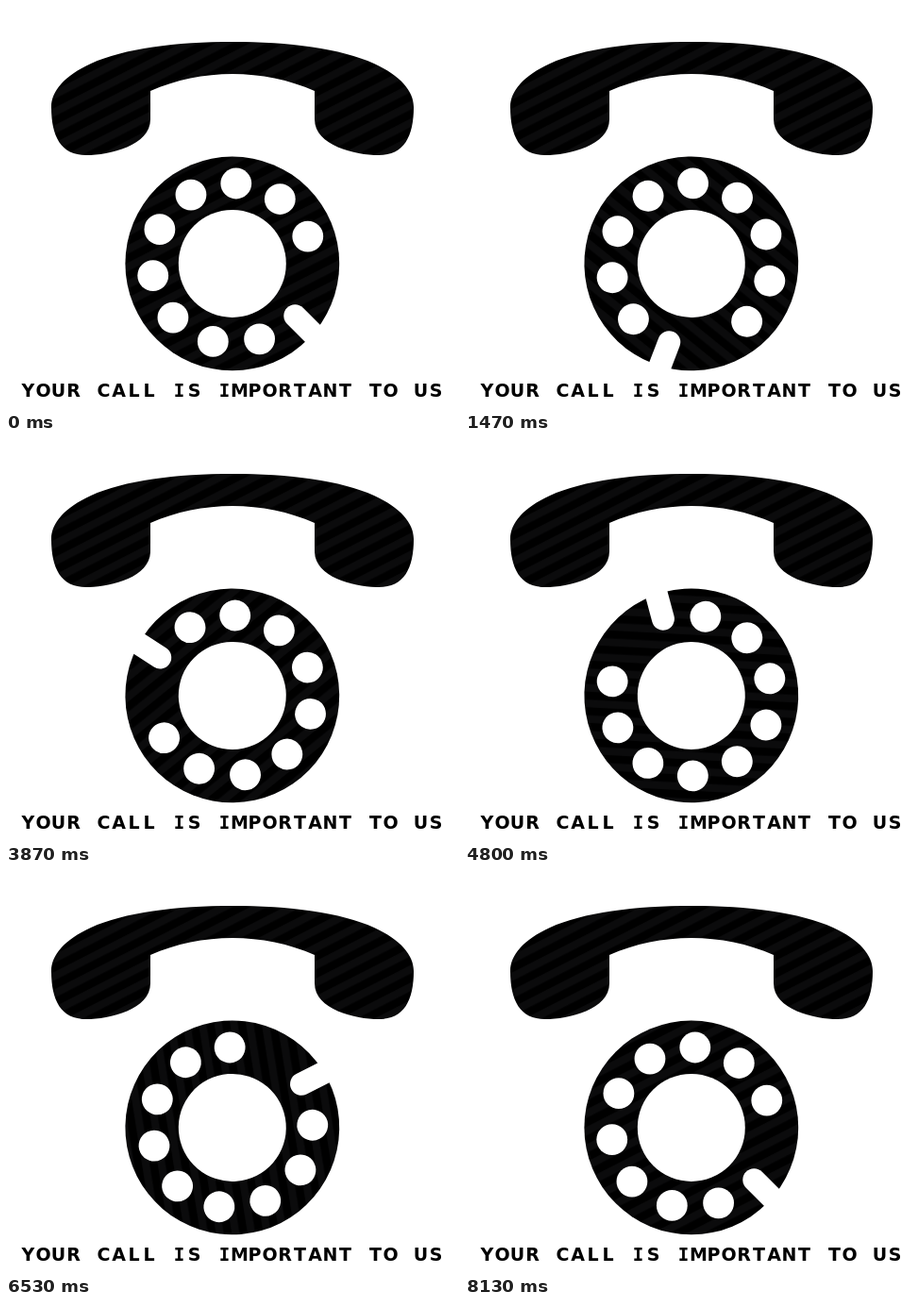
An HTML page that plays this animation: 480 by 428 pixels, repeating every 8.27 s.

```html
<!DOCTYPE html>
<html lang="en">
<head>
<meta charset="utf-8">
<title>On hold</title>
<style>
  html, body { margin: 0; height: 100%; overflow: hidden; background: #fff; }
  svg { display: block; width: 100vw; height: 100vh; }
  text { font: bold 19px "DejaVu Sans", sans-serif; text-anchor: middle; }
  .slab { font-family: "DejaVu Sans Mono", monospace; }
</style>
</head>
<body>
<svg viewBox="0 0 480 428">
  <defs>
    <pattern id="stripes" width="40" height="16.5" patternUnits="userSpaceOnUse" patternTransform="rotate(-27)">
      <rect width="40" height="16.5"/>
      <rect y="4" width="40" height="8" fill="#0b0b0c"/>
    </pattern>
  </defs>
  <g id="dial" fill="#fff">
    <circle cx="239.8" cy="272.9" r="113.4" fill="url(#stripes)"/>
    <circle cx="239.8" cy="272.9" r="57"/>
    <path d="M306.3 328.3l27 27" stroke="#fff" stroke-width="24" stroke-linecap="round"/>
  </g>
  <path fill="url(#stripes)" d="M240 38C180 38 125 45 90 61C62 74 48 90 48 107C48 138 58 158 85 158
    C110 158 153 148 153 120V90C180 78 210 72 240 72C270 72 300 78 327 90V120
    C327 148 370 158 395 158C422 158 432 138 432 107C432 90 418 74 390 61C355 45 300 38 240 38Z"/>
  <text id="line" y="414">YOUR CALL <tspan class="slab">I</tspan>S <tspan class="slab">I</tspan>MPORTANT TO US</text>
</svg>
<script>
  const CX = 239.8, CY = 272.9, LOOP = 8270;
  const dial = document.getElementById('dial');
  const line = document.getElementById('line');

  // one fixed-width cell per letter
  line.setAttribute('x', [...line.textContent].map((_, i) => 23.5 + 16 * i).join(' '));

  for (let i = 0; i < 9; i++) {
    const a = (70.2 + 33.75 * i) * Math.PI / 180;
    const hole = document.createElementNS('http://www.w3.org/2000/svg', 'circle');
    hole.setAttribute('cx', CX + 85 * Math.cos(a));
    hole.setAttribute('cy', CY + 85 * Math.sin(a));
    hole.setAttribute('r', 16.4);
    dial.append(hole);
  }

  // three ticks of 6 degrees every 400 ms, with one tick skipped
  function angle(t) {
    const r = t % 400;
    const tick = 3 * Math.floor(t / 400) + (r >= 130) + (r >= 270);
    return 6 * (tick - (tick >= 22));
  }

  const start = performance.now();
  function draw(now) {
    const t = Math.max(0, now - start) % LOOP;
    dial.setAttribute('transform', `rotate(${angle(t)} ${CX} ${CY})`);
    requestAnimationFrame(draw);
  }
  draw(start);
</script>
</body>
</html>
```
